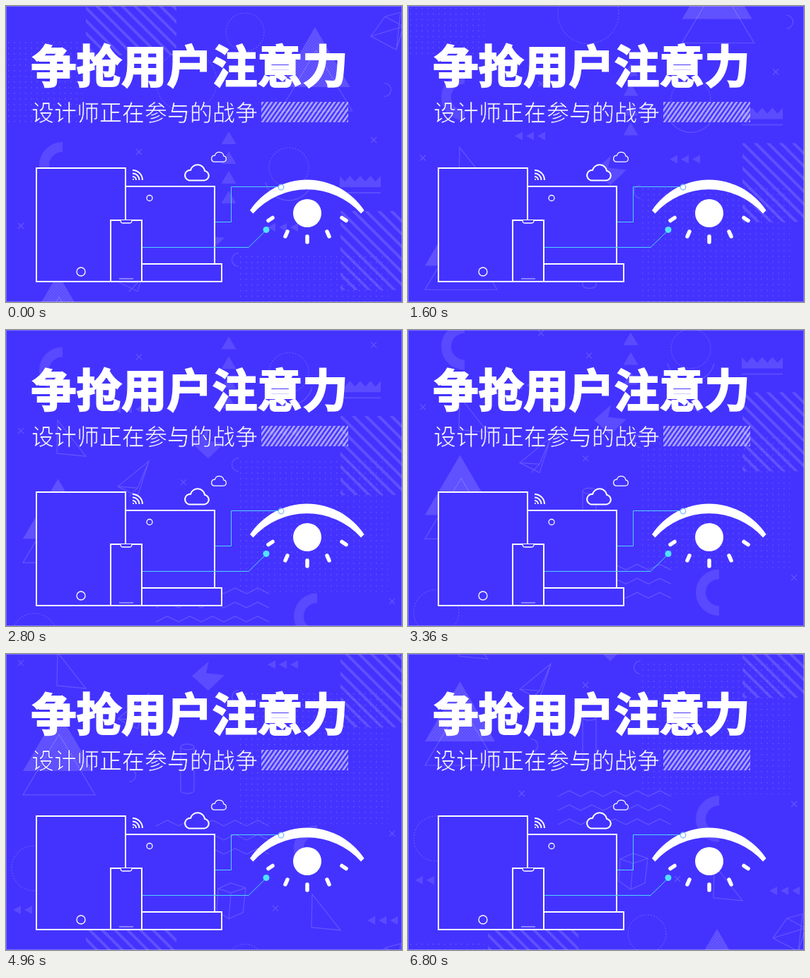
Recreate the animation shown at these times as an HTML page. Size 560 px wide and 420 px high, loop 6.88 s.

```html
<!DOCTYPE html>
<html lang="zh">
<head>
<meta charset="utf-8">
<style>
html, body { margin: 0; width: 100%; height: 100%; overflow: hidden; background: #4433ff; }
svg { display: block; width: 560px; height: 420px; }
text { fill: #fff; font-family: "Noto Sans CJK SC", "Noto Sans CJK", sans-serif; }
#scroll { fill: #fff; stroke: none; }
#scroll .fill { fill-opacity: .12; }
#scroll .line { fill: none; stroke: #fff; stroke-opacity: .17; stroke-width: 1.2; }
#scroll .bold { fill: none; stroke: #fff; stroke-opacity: .11; stroke-width: 14; }
#scroll .dash { stroke-dasharray: 2 2; }
.device { fill: #4433ff; stroke: #fff; stroke-width: 2; }
.wire { fill: none; stroke: #4fd2fa; stroke-width: 1; }
</style>
</head>
<body>
<svg viewBox="0 0 560 420">
  <defs>
    <pattern id="dots" width="8" height="8" patternUnits="userSpaceOnUse">
      <rect x="3" y="3" width="1.6" height="1.6" fill="#fff" fill-opacity=".15"/>
    </pattern>
    <pattern id="fine" width="4" height="4" patternUnits="userSpaceOnUse">
      <path d="M0 0h1.6v1.6h-1.6zM2 2h1.6v1.6h-1.6z" fill="#fff" fill-opacity=".2"/>
    </pattern>
    <pattern id="hatch" width="12.700" height="9" patternUnits="userSpaceOnUse" patternTransform="rotate(-45)">
      <rect width="3.800" height="9" fill="#fff" fill-opacity=".15"/>
    </pattern>
    <pattern id="slash" width="5.200" height="8" patternUnits="userSpaceOnUse" patternTransform="rotate(35)">
      <rect width="2.700" height="8" fill="#fff" fill-opacity=".55"/>
    </pattern>
    <path id="cloud" d="M8 23.500H28.500A6.500 6.500 0 0 0 29.500 10.600A10 10 0 0 0 10 9.500A7.100 7.100 0 0 0 8 23.500Z"/>
  </defs>
  <g id="scroll"></g>

  <text x="35.500" y="108.500" font-size="64" font-weight="900" stroke="#fff" stroke-width="2.200">争抢用户注意力</text>
  <text x="36" y="162.500" font-size="32" font-weight="300" stroke="#4433ff" stroke-width=".7">设计师正在参与的战争</text>
  <rect x="361" y="136" width="123" height="29" fill="url(#slash)"/>

  <g class="device">
    <rect x="43" y="230" width="126" height="161"/>
    <rect x="169" y="256" width="126" height="110"/>
    <rect x="180" y="366" width="125" height="25"/>
    <rect x="148" y="304" width="44" height="87"/>
    <g stroke-width="1.300">
      <circle cx="106" cy="377" r="6"/>
      <circle cx="203" cy="272.500" r="4"/>
      <path d="M162 304q0 4 3 4h10q3 0 3-4"/>
      <path d="M160 387h20" stroke-opacity=".6"/>
    </g>
    <use href="#cloud" transform="translate(250.500 223) scale(1.040)"/>
    <use href="#cloud" transform="translate(289 206) scale(.64)"/>
    <path d="M179 242a5 5 0 0 1 5 5M179 237.500a9.500 9.500 0 0 1 9.500 9.500M179 233a14 14 0 0 1 14 14" fill="none"/>
    <circle cx="180" cy="246" r="1" stroke="none" style="fill:#fff"/>
  </g>

  <g fill="#fff">
    <path d="M345 290A96.800 96.800 0 0 1 506.500 290L502 294.500A102 102 0 0 0 349.500 294.500Z"/>
    <circle cx="426" cy="294" r="20"/>
    <path d="M377 300.500l-6 4M398 320l-3 7M426 327v8M454 320l3 7M475 300.500l6 4" stroke="#fff" stroke-width="5.500" stroke-linecap="round"/>
  </g>
  <g class="wire">
    <path d="M296 306.500H318.500V256.500H385.500M193 342.500H343L368 318"/>
    <circle cx="389" cy="257" r="3.800" stroke="#86b9ff" stroke-width="1.300"/>
    <circle cx="368" cy="317.500" r="4.500" fill="#4fe3ff" stroke="none"/>
  </g>
  <rect x=".5" y=".5" width="559" height="419" fill="none" stroke="#fff" stroke-opacity=".3"/>
</svg>
<script>
const scroll = document.getElementById('scroll');
const path = (cls, d) => `<path class="${cls}" d="${d}"/>`;
const ring = (x, y, r) => `<circle class="line dash" cx="${x}" cy="${y}" r="${r}"/>`;
const area = (id, x, y, w, h) => `<rect x="${x}" y="${y}" width="${w}" height="${h}" fill="url(#${id})"/>`;
const cross = (x, y) => path('line', `M${x - 4} ${y - 4}l8 8m0-8l-8 8`);
const arrows = (x, y) => [0, 16, 32].map(i => path('fill', `M${x + i} ${y}l11-6v12z`)).join('');
const peak = (x, y, w, h) => `M${x} ${y}l${w / 2} ${h}h${-w}z`;
const cee = (x, y) => path('bold', `M${x} ${y - 26}a26 26 0 0 0 0 52`);
const moon = (x, y, sweep) => path('line', `M${x} ${y - 9.5}a9.500 9.500 0 1 ${sweep} 0 19`);
const sail = (x, y) => path('line', `M${x} ${y}l40 51l-41-4z`);
const crystal = (x, y) => path('line', `M${x + 44} ${y}L${x} ${y + 36}l28 14zl-16 38l-12 12m12-12l-28-2`);
const box = (x, y) => path('line', `M${x} ${y + 8}l18-8l21 7l-4 35l-20 9l-17-12zl18 6l21-7m-21 7l-3 37`);
const wave = y => path('line', `M212 ${y + 4}` + 'l16-8l16 8'.repeat(5));
// A filled peak with an outlined one just below it.
const pyramids = (x, y) => path('fill', peak(x, y, 99, 85)) +
  `<path d="${peak(x, y, 99, 85)}" fill="url(#fine)" opacity=".5"/>` +
  path('line', peak(x + 1.5, y + 33, 102, 86));

const HEIGHT = 701;
const tile = [
  area('dots', 0, 48, 108, 118),
  area('dots', 325, 350, 215, 190),
  area('hatch', 473, 291, 112, 112),
  area('hatch', 113, -20, 128, 90),
  ring(338, 37, 27), ring(400, 229, 28), ring(40, 603, 32), ring(255, 107, 43),
  path('line', 'M367 250a34 34 0 0 0 66 0'),
  pyramids(437, 30), pyramids(73.5, 380),
  ...[178, 206, 234, 262].map(y => path('fill', peak(315, y, 21, 18))),
  cee(80, 226), cee(440, 575),
  moon(329, 360, 0), moon(174, 471, 1), moon(535, 119, 1),
  path('fill', 'M472 241l7 8l7.500-8l7 8l7.500-8l7 8l7.500-8l7 8l7.500-8v16h-58zM472 264h58v2h-58z'),
  arrows(151, 281), arrows(370, 314), arrows(10, 662), arrows(511, 677),
  path('fill', 'M263 330L287 309L283 326L309 329L286 351Z'),
  path('line', 'M247 431v62a9.500 4 0 0 0 19 0v-62a9.500 4 0 0 0-19 0a9.500 4 0 0 0 19 0'),
  wave(539), wave(559), wave(579),
  sail(73, 297), sail(433, 640),
  path('line', 'M516 43L536 15L558 9L552 62ZL562 29M536 15L562 29L552 62'),
  crystal(158, 355), box(300, 624),
  ...[[520, 190], [188, 207], [256, 239], [21, 312], [161, 539], [251, 385], [546, 554], [381, 660]].map(p => cross(...p))
].join('');
scroll.innerHTML = `<g id="tile">${tile}</g><use href="#tile" y="${HEIGHT}"/>`;

// Constant drift, then a short even slowdown to rest.
const LOOP = 6880, STEP = 80, SPEED = 60.3, SLOW = 5.51, STOP = 5.8;
function offset(t) {
  const u = Math.max(0, Math.min(t, STOP) - SLOW);
  return SPEED * (Math.min(t, SLOW) + u - u * u / (2 * (STOP - SLOW)));
}
function draw() {
  const t = Math.floor(performance.now() % LOOP / STEP) * STEP / 1000;
  scroll.setAttribute('transform', `translate(0 ${-offset(t)})`);
  requestAnimationFrame(draw);
}
draw();
</script>
</body>
</html>
```
